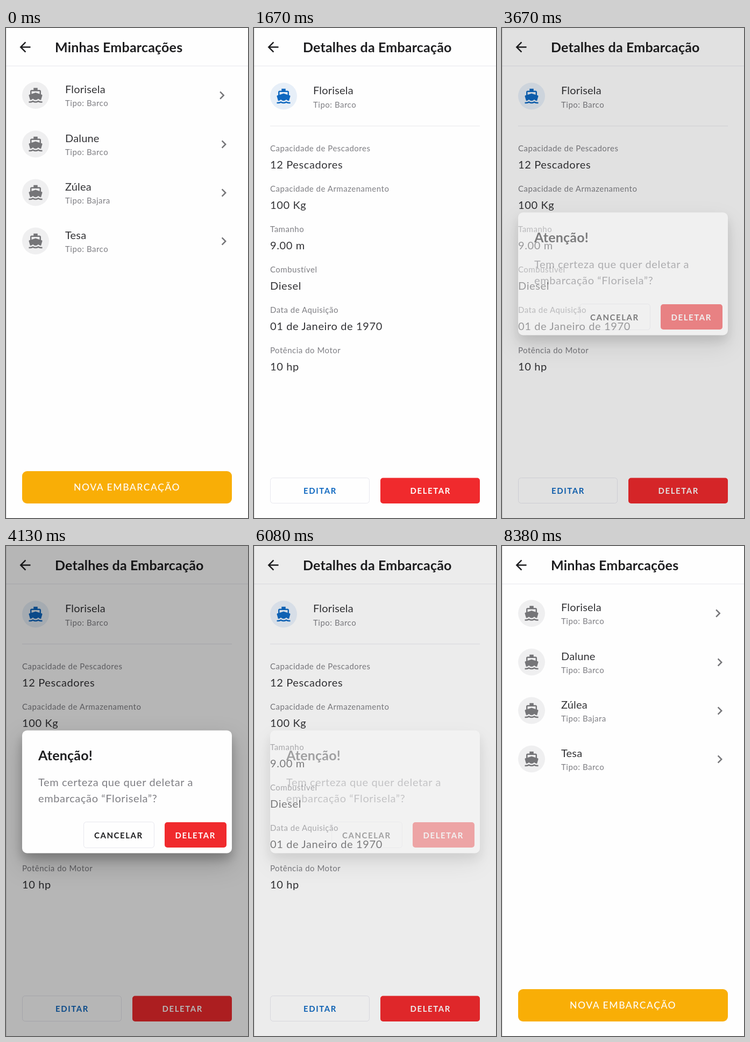
These frames come from a looping animation (450x910 px, 8930 ms). An HTML page:

```html
<!DOCTYPE html>
<html lang="pt">
<head>
<meta charset="utf-8">
<title>Embarcações</title>
<style>
  html, body { margin: 0; width: 100%; height: 100%; overflow: hidden; background: #fefefe; }
  svg { display: block; font-family: Lato, sans-serif; }
  .title { font-size: 25px; font-weight: 700; letter-spacing: .19px; fill: #1e1e20; }
  .name { font-size: 20px; letter-spacing: .19px; fill: #333336; }
  .value { font-size: 20px; letter-spacing: .625px; fill: #333336; }
  .body { font-size: 20px; letter-spacing: .625px; fill: #7f7f84; }
  .caption { font-size: 15px; letter-spacing: .5px; fill: #7f7f84; }
  .button { font-size: 15px; font-weight: 700; letter-spacing: 1.56px; }
  .wide { font-size: 17.5px; font-weight: 500; letter-spacing: 1.56px; }
  #card { filter: drop-shadow(0 11px 9px rgba(0,0,0,.2)) drop-shadow(0 18px 22px rgba(0,0,0,.2)); }
</style>
</head>
<body>
<svg width="450" height="910" viewBox="0 0 450 910">
  <defs>
    <path id="back" d="M20 11H7.83l5.59-5.59L12 4l-8 8 8 8 1.41-1.41L7.83 13H20z"/>
    <path id="chevron" d="M8.59 16.59 13.17 12 8.59 7.41 10 6l6 6-6 6z"/>
    <path id="boat" d="M20 21c-1.39 0-2.78-.47-4-1.32-2.44 1.71-5.56 1.71-8 0C6.78 20.53 5.39 21 4 21H2v2h2c1.38 0 2.74-.35 4-.99 2.52 1.29 5.48 1.29 8 0 1.26.65 2.62.99 4 .99h2v-2zM3.95 19H4c1.6 0 3.02-.88 4-2 .98 1.12 2.4 2 4 2s3.02-.88 4-2c.98 1.12 2.4 2 4 2h.05l1.89-6.68c.08-.26.06-.54-.06-.78s-.34-.42-.6-.5L20 10.62V6c0-1.1-.9-2-2-2h-3V1H9v3H6c-1.1 0-2 .9-2 2v4.62l-1.29.42c-.26.08-.48.26-.6.5s-.15.52-.06.78zM6 6h12v3.97L12 8 6 9.97z"/>
  </defs>
  <g id="list"></g>
  <g id="detail"></g>
  <rect id="dim" width="450" height="910"/>
  <g id="modal"></g>
  <rect width="1" height="910" opacity=".12"/>
</svg>
<script>
const LOOP = 8930;
const BOAT = 'Florisela';
const RED = '#f02a2d', BLUE = '#0f68c0', WHITE = '#fefefe', INK = '#1e1e20', GREY = '#757578', LINE = '#e7e7ee';
const $ = id => document.getElementById(id);

const text = (cls, x, y, str, fill) =>
  `<text class="${cls}" x="${x}" y="${y}"${fill ? ` style="fill:${fill}"` : ''}>${str}</text>`;
const box = (x, y, w, h, fill, r = 0, stroke = 'none') =>
  `<rect x="${x}" y="${y}" width="${w}" height="${h}" rx="${r}" fill="${fill}" stroke="${stroke}"/>`;
const icon = (id, cx, cy, fill) =>
  `<use href="#${id}" transform="translate(${cx - 15} ${cy - 15}) scale(1.25)" fill="${fill}"/>`;

const screen = title =>
  box(0, 0, 450, 910, WHITE) + box(0, 70, 450, 1, LINE) +
  icon('back', 35.5, 35.5, INK) + text('title', 91, 45, title);

const boatRow = (name, type, cy, nameY, typeY, disc, tint) =>
  `<circle cx="55" cy="${cy}" r="25" fill="${disc}"/>` + icon('boat', 55, cy, tint) +
  text('name', 110, nameY, name) + text('caption', 110, typeY, 'Tipo: ' + type);

const boats = [[BOAT, 'Barco'], ['Dalune', 'Barco'], ['Zúlea', 'Bajara'], ['Tesa', 'Barco']];
$('list').innerHTML = screen('Minhas Embarcações') +
  boats.map(([name, type], i) => {
    const y = 125 + i * 90 + (i ? .5 : 0), textY = 120.5 + i * 90 + (i ? 1 : 0);
    return boatRow(name, type, y, textY, textY + 24.5, '#efeff0', GREY) +
      icon('chevron', i ? 405 : 401.5, y + (i ? .5 : 0), GREY);
  }).join('') +
  box(30, 823, 390, 60, '#f9ae06', 9) + text('wide', 126, 859, 'NOVA EMBARCAÇÃO', WHITE);

const fields = [
  ['Capacidade de Pescadores', '12 Pescadores'], ['Capacidade de Armazenamento', '100 Kg'],
  ['Tamanho', '9.00 m'], ['Combustível', 'Diesel'],
  ['Data de Aquisição', '01 de Janeiro de 1970'], ['Potência do Motor', '10 hp']
];
$('detail').innerHTML = screen('Detalhes da Embarcação') +
  boatRow(BOAT, 'Barco', 126.5, 123, 147.5, '#e7eff8', BLUE) + box(30, 181.5, 390, 1, LINE) +
  fields.map(([label, value], i) =>
    text('caption', 30, 229 + i * 75, label) + text('value', 30, 260.5 + i * 75, value)).join('') +
  box(30.5, 835.5, 184, 47, 'none', 5, LINE) + text('button', 92, 865, 'EDITAR', BLUE) +
  box(235, 835.5, 185, 47.5, RED, 5) + text('button', 290.5, 865, 'DELETAR', WHITE);

$('modal').innerHTML =
  `<g id="card">${box(30, 342.5, 390, 228, WHITE, 9)}</g>` +
  text('title', 60, 397.5, 'Atenção!') +
  text('body', 60, 445.5, 'Tem certeza que quer deletar a') +
  text('body', 60, 475.5, `embarcação “${BOAT}”?`) +
  box(144.5, 512.5, 131, 48, 'none', 5, LINE) + text('button', 164, 542.5, 'CANCELAR', INK) +
  box(295, 513, 115, 47, RED, 5) + text('button', 314.5, 542.5, 'DELETAR', WHITE);

// Gentle spring: mass 1, stiffness 100, damping 15
function spring(ms) {
  if (ms <= 0) return 0;
  const s = ms / 1000, w = Math.sqrt(100 - 7.5 ** 2);
  return Math.min(1, 1 - Math.exp(-7.5 * s) * (Math.cos(w * s) + 7.5 / w * Math.sin(w * s)));
}
const shown = (t, start, end) => Math.max(0, spring(t - start) - spring(t - end));
const fade = (id, opacity) => $(id).setAttribute('opacity', opacity);

const begin = performance.now();
function draw() {
  const t = (performance.now() - begin) % LOOP;
  const modal = shown(t, 3520, 5900);
  fade('detail', shown(t, 860, 7860));
  fade('modal', modal);
  fade('dim', .285 * modal ** 1.4);
  requestAnimationFrame(draw);
}
draw();
</script>
</body>
</html>
```
